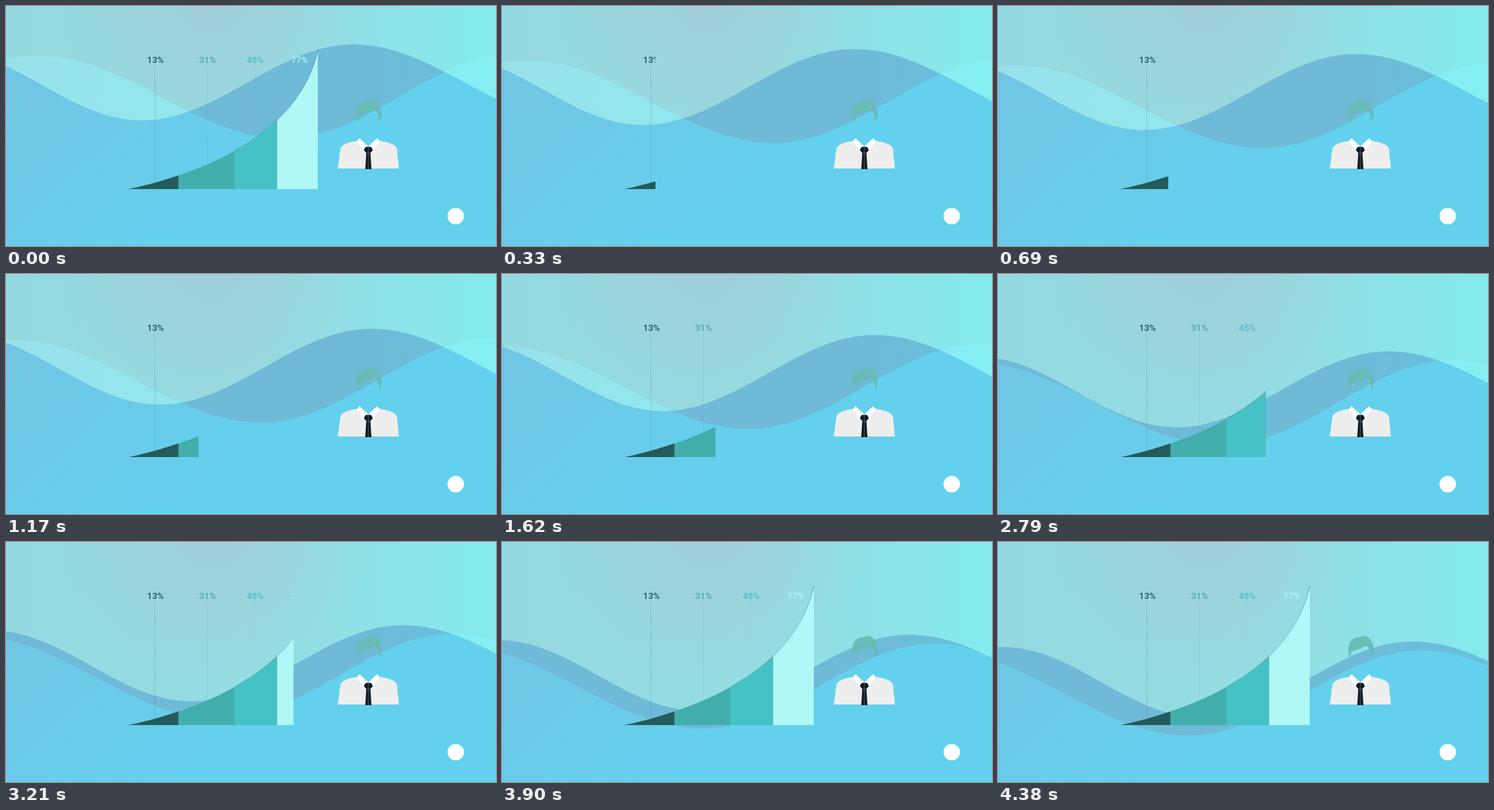
Write an HTML page that moves like this. It is 712 px wide and 350 px high and loops after 4440 ms.

```html
<!DOCTYPE html>
<html lang="en">
<head>
<meta charset="utf-8">
<title>Growth chart</title>
<style>
  html, body { margin: 0; width: 100%; height: 100%; overflow: hidden; }
  svg { position: absolute; left: 0; top: 0; width: 712px; height: 350px; }

  .rise {
    d: path("M-390 167C-285 167-197 64-92 64S92 167 197 167C309 167 393 56 505 56C622 56 710 167 827 167V450H-390Z");
    animation: drift-right 4440ms linear infinite;
  }
  .swell {
    d: path("M-311 193C-181 193-83 72.5 47 72.5S275 193 405 193C528 193 620 69 743 69S958 193 1081 193V450H-311Z");
    animation: drift-left 4440ms linear infinite;
  }
  @keyframes drift-right { to { transform: translate(99.3px, 90.2px); } }
  @keyframes drift-left { to { transform: translate(-128.7px, 90.2px); } }

  /* The full chart shows for an instant, then wipes in from the left. */
  .chart { animation: wipe 4440ms linear infinite; }
  @keyframes wipe {
    0%, .67% { clip-path: inset(0 258px 0 0); }
    .6701% { clip-path: inset(0 509.4px 0 0); }
    84.4%, 100% { clip-path: inset(0 258px 0 0); }
  }
  .chart text { font: 500 13px Roboto, sans-serif; }
</style>
</head>
<body>
<svg viewBox="0 0 712 350">
  <defs>
    <linearGradient id="sky">
      <stop stop-color="#94d9e0"/>
      <stop offset=".5" stop-color="#95dde2"/>
      <stop offset=".75" stop-color="#8ee2e7"/>
      <stop offset="1" stop-color="#83ebee"/>
    </linearGradient>
    <radialGradient id="haze" gradientUnits="userSpaceOnUse" cx="300" cy="-10" r="230">
      <stop stop-color="#a1cdd8"/>
      <stop offset="1" stop-color="#a1cdd8" stop-opacity="0"/>
    </radialGradient>
    <linearGradient id="pale" gradientUnits="userSpaceOnUse" x1="0" x2="712">
      <stop stop-color="#98e2ea"/>
      <stop offset="1" stop-color="#86eff4"/>
    </linearGradient>
    <linearGradient id="dusk" gradientUnits="userSpaceOnUse" x1="0" x2="712">
      <stop stop-color="#6fbad8"/>
      <stop offset=".7" stop-color="#6fbad7"/>
      <stop offset="1" stop-color="#68c0dd"/>
    </linearGradient>
    <linearGradient id="sea" gradientUnits="userSpaceOnUse" x1="60" y1="80" x2="300" y2="350">
      <stop stop-color="#71c6e5"/>
      <stop offset="1" stop-color="#63d1ee"/>
    </linearGradient>
    <clipPath id="in-rise"><path class="rise"/></clipPath>
    <clipPath id="in-swell"><path class="swell"/></clipPath>
  </defs>
  <rect width="712" height="350" fill="url(#sky)"/>
  <rect width="712" height="350" fill="url(#haze)"/>
  <g clip-path="url(#in-swell)"><rect width="712" height="350" fill="url(#pale)"/></g>
  <g clip-path="url(#in-rise)">
    <rect width="712" height="350" fill="url(#dusk)"/>
    <g clip-path="url(#in-swell)"><rect width="712" height="350" fill="url(#sea)"/></g>
  </g>
</svg>

<svg class="chart" viewBox="0 0 712 350">
  <defs>
    <clipPath id="area"><path d="M178 267C300 241 428 180 453 66V267Z"/></clipPath>
  </defs>
  <g stroke="#235b5b">
    <path d="M216.5 88V260" opacity=".2"/>
    <path d="M292.5 88V240" opacity=".07"/>
    <path d="M362.5 88V195" opacity=".05"/>
    <path d="M426.5 88V135" opacity=".04"/>
    <path d="M331 212C389 179 439 133 453 64" fill="none" stroke-width=".8" opacity=".6"/>
  </g>
  <g clip-path="url(#area)">
    <rect x="178" y="60" width="73" height="207" fill="#235b5b"/>
    <rect x="250.5" y="60" width="82" height="207" fill="#42aeac"/>
    <rect x="331.5" y="60" width="63" height="207" fill="#46c1c5"/>
    <rect x="394" y="60" width="59" height="207" fill="#b0f7f7"/>
  </g>
  <text x="205" y="83" fill="#1f5656">13%</text>
  <text x="280.7" y="83" fill="#42aeac">31%</text>
  <text x="350" y="83" fill="#46c1c5">45%</text>
  <text x="414.3" y="83" fill="#b0f7f7">77%</text>
</svg>

<svg viewBox="0 0 712 350">
  <path fill="#68bbb4" opacity=".92" d="M511 170C508 160 508 149 514 143C518 139 523 138 526 139C529 136 535 137 538 139C539 141 541 142 543 145C547 153 546 163 543 170C542 163 541 156 536 152C531 151 529 156 523 157L525 154C521 159 517 158 514 160C512 163 512 167 511 170Z"/>
  <path fill="#eeeded" d="M482 237L486 208C488 201 502 197 512 197L526.5 207L541 197C551 197 566 201 568 208L571 237Z"/>
  <path fill="#fff" d="M514 193L526.5 204.500L519 210.500L509.500 197ZM539 193L526.500 204.500L534 210.500L543.500 197Z"/>
  <path fill="#111b20" d="M522.500 205.500H530.500L533 210L529.500 214.500L531 238H522L523.500 214.500L520 210Z"/>
  <path fill="none" stroke="#6f777a" stroke-width=".6" d="M526.500 206V238M523.500 214.500H529.500"/>
  <circle cx="653.5" cy="306.500" r="12" fill="#fff"/>
</svg>
</body>
</html>
```
